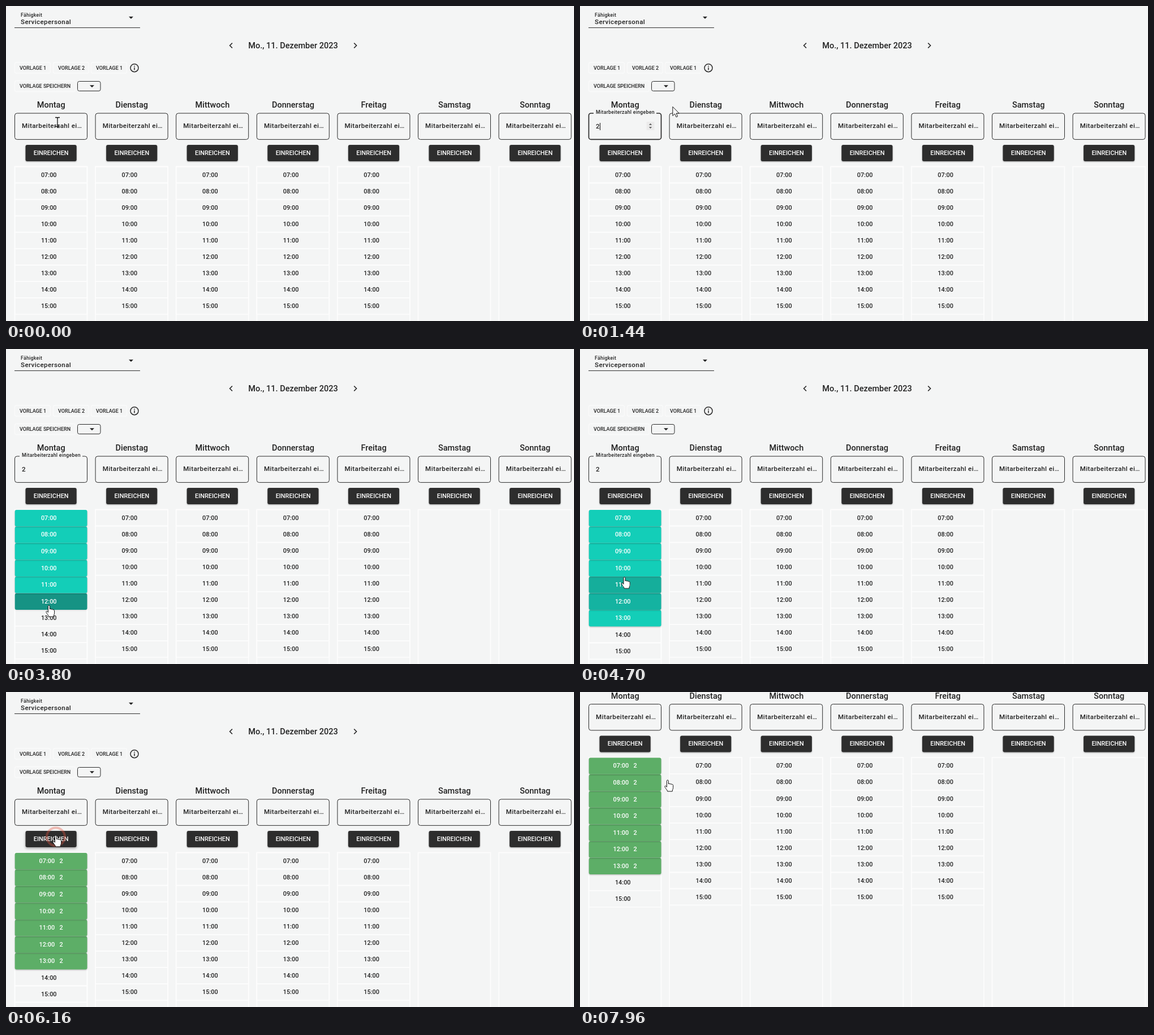
Recreate the animation shown at these times as an HTML page. Size 1004 by 558 pixels, loop 8 s.

```html
<!DOCTYPE html>
<html lang="de">
<head>
<meta charset="utf-8">
<title>Dienstplanung</title>
<style>
  html, body { margin: 0; width: 100%; height: 100%; overflow: hidden; background: #f4f5f5; }
  svg { display: block; width: 1004px; height: 558px; }
  text { font: 500 10.9px Roboto, Arial, sans-serif; fill: #222; white-space: pre; }
  .mid { text-anchor: middle; }
  .head { font-size: 14.5px; }
  .chip { font-size: 9px; }
  .input { font-size: 11.64px; letter-spacing: .031em; }
  .small { font-size: 8.73px; letter-spacing: .031em; }
  .light { fill: #fff; }
  .line { fill: none; stroke: #2b2b2b; }
  .white { fill: none; stroke: #fdfdfd; stroke-width: 1.6; }
  .button { fill: #2d2d2d; filter: drop-shadow(0 1px 1.2px rgba(0,0,0,.35)); }
  .cursor { fill: #fff; stroke: #111; stroke-width: 1; stroke-linejoin: round; }
</style>
</head>
<body>
<script>
const LOOP = 8000, ROWS = 9, TOP = 284.5, ROW = 29.06, PITCH = 142.6;
const DAYS = ['Montag', 'Dienstag', 'Mittwoch', 'Donnerstag', 'Freitag', 'Samstag', 'Sonntag'];
const BG = [244, 245, 245], TEAL = [19, 206, 184], DARK = [22, 147, 132];
const PRESSED = [80, 208, 193], GREEN = [93, 174, 103], INK = [34, 34, 34], WHITE = [255, 255, 255];

// Pointer path: time, x, y
const PATH = [
  [0, 91, 205], [130, 91, 205], [200, 89.5, 208], [1230, 89.5, 208], [1440, 163.5, 178],
  [1580, 214, 240], [1720, 152, 337], [1930, 150, 278], [2060, 112, 270], [2200, 88, 290],
  [2340, 84, 293], [2800, 84, 296], [2880, 80, 314], [2940, 78, 330], [3600, 77, 440],
  [3800, 76, 454], [3900, 76, 468], [4200, 76, 474], [4430, 76, 474], [5260, 84, 260],
  [5330, 88, 254], [6960, 88, 254], [7440, 155, 156]
];
const PICKED = [2880, 3022, 3199, 3376, 3553, 3856, 4100];
const CLICKS = [[400, 89.5, 208], [2340, 84.5, 293], [5500, 88, 256.5]];
const FOCUS = 470, TYPED = 1030, BLUR = 2340, SENT = 5950;

const clamp = v => Math.max(0, Math.min(1, v));
const ramp = (t, start, length) => clamp((t - start) / length);
const smooth = u => u * u * (3 - 2 * u);
const lerp = (a, b, u) => a + (b - a) * u;
const mix = (a, b, u) => a.map((v, i) => lerp(v, b[i], u));
const rgb = c => `rgb(${c.map(Math.round)})`;
const show = (node, on) => node.setAttribute('visibility', on ? 'visible' : 'hidden');

function add(parent, tag, attrs = {}, content) {
  const node = document.createElementNS('http://www.w3.org/2000/svg', tag);
  set(node, attrs);
  if (content) node.textContent = content;
  return parent.appendChild(node);
}
function set(node, attrs) {
  for (const key in attrs) node.setAttribute(key, attrs[key]);
}
const box = (parent, x, y, width, height, rx, cls) =>
  add(parent, 'rect', { x, y, width, height, rx, class: cls });
const label = (parent, x, y, content, cls = '') =>
  add(parent, 'text', { x, y, class: cls }, content);
const path = (parent, d, attrs) => add(parent, 'path', { d, ...attrs });
const arrow = (parent, x, y, w, h) =>
  path(parent, `M${x - w} ${y - h / 2}h${2 * w}l${-w} ${h}z`, { fill: '#222' });

const svg = add(document.body, 'svg', { viewBox: '0 0 1004 558' });
const page = add(svg, 'g');

// Toolbar
label(page, 26, 18.6, 'Fähigkeit', 'small');
label(page, 26, 32.3, 'Servicepersonal', 'input');
path(page, 'M15 38.4H237', { class: 'line' });
arrow(page, 221, 20.7, 4, 4);
label(page, 507.5, 74.7, 'Mo., 11. Dezember 2023', 'mid head');
path(page, 'M400 65.6L395.6 70L400 74.4M615.2 65.6L619.6 70L615.2 74.4', { class: 'line', 'stroke-width': 1.6 });
[[15.5, 63, 'VORLAGE 1'], [83.5, 63, 'VORLAGE 2'], [150.5, 63, 'VORLAGE 1']].forEach(([x, w, name]) => {
  box(page, x, 100, w, 19, 3, 'white').setAttribute('opacity', .6);
  label(page, x + 8.6, 112.7, name, 'chip');
});
box(page, 15.5, 132.5, 107, 19, 3, 'white').setAttribute('opacity', .6);
label(page, 24, 145.2, 'VORLAGE SPEICHERN', 'chip');
add(page, 'circle', { cx: 227, cy: 109.7, r: 7, class: 'line', 'stroke-width': 1.5 });
path(page, 'M227 108.8v4.6M227 105.8v1.6', { class: 'line', 'stroke-width': 1.5 });
box(page, 126.5, 133.5, 40.5, 17, 3, 'line');
arrow(page, 152, 142.2, 4, 4);

// Day columns
const fields = [], buttons = [], rows = [];
DAYS.forEach((day, d) => {
  const x = 15.5 + d * PITCH, mid = x + 64.2;
  label(page, mid, 180, day, 'mid head');
  fields.push({
    frame: box(page, x, 190, 128, 46.4, 4, 'line'),
    gap: box(page, 24, 187, 111, 5, 0, ''),
    text: label(page, x + 12.6, 216.3, 'Mitarbeiterzahl ei…', 'input')
  });
  fields[d].gap.setAttribute('fill', rgb(BG));
  show(fields[d].gap, false);
  buttons.push(box(page, x + 19, 246, 90.2, 29, 3, 'button'));
  label(page, mid, 263.9, 'EINREICHEN', 'mid light');
  box(page, x, TOP, 128, 600, 0, 'white');
  if (d > 4) return;
  for (let i = ROWS - 1; i >= 0; i--) {
    const g = add(page, 'g', { transform: `translate(${x} ${TOP + i * ROW})` });
    const cell = box(g, 0, 0, 128, ROW, 0, 'white');
    const hour = label(g, 46.4, 18.4, String(7 + i).padStart(2, '0') + ':00');
    if (d) continue;
    const fill = box(g, .2, .4, 127.8, 29.3, 3, '');
    g.insertBefore(fill, hour);
    const count = label(g, 79, 18.4, '2', 'light');
    rows[i] = { g, x, cell, fill, hour, count };
  }
});

// Parts of the edited field
const value = label(page, 28, 217, '2', 'input');
const caret = path(page, 'M35.5 207V220', { stroke: '#111' });
const spinner = add(page, 'g');
box(spinner, 117.5, 205, 14, 15, 1, '').setAttribute('fill', '#ebebeb');
path(spinner, 'M121.8 210.8h5.4l-2.7-2.9zM121.8 214.2h5.4l-2.7 2.9z', { fill: '#555' });

const ring = add(svg, 'circle', { fill: 'none', stroke: '#e25440', 'stroke-width': 4 });
const cursors = {
  beam: path(svg, 'M-4-7.5h3l1 1 1-1h3M0-6.5v14M-4 8.5h3l1-1 1 1h3', { fill: 'none', stroke: '#111', 'stroke-width': 1.3 }),
  arrow: path(svg, 'M0 0V16L3.7 12.5L6.2 18.3L8.7 17.2L6.3 11.6H11.3Z', { class: 'cursor' }),
  hand: path(svg, 'M-1.6 1.4C-1.6-.4 1.4-.4 1.4 1.4V7C1.6 5.6 4.2 5.8 4.3 7.4C4.6 6.2 7 6.4 7.1 8.1C7.5 7.2 9.6 7.4 9.6 9.4V13.5C9.6 16 8.2 17 8.2 20H-.4C-.6 17.5-3.4 15.5-4.8 12.5C-6 10.3-3.6 9.6-2.6 11L-1.6 12.4Z', { class: 'cursor' })
};

function pointer(t) {
  const next = PATH.findIndex(p => p[0] > t);
  if (next < 0) return PATH[PATH.length - 1].slice(1);
  if (next === 0) return PATH[0].slice(1);
  const a = PATH[next - 1], b = PATH[next], u = ramp(t, a[0], b[0] - a[0]);
  return [lerp(a[1], b[1], u), lerp(a[2], b[2], u)];
}

// Hover fades over 200 ms: the share of that span spent on each target
function hovers(t) {
  const share = { rows: Array(ROWS).fill(0), button: 0 };
  for (let k = 0; k < 20; k++) {
    const [x, y] = pointer(t - k * 10);
    const i = Math.floor((y - TOP) / 29.55);
    if (x > 15.5 && x < 143.5 && i >= 0 && i < ROWS) share.rows[i] += .05;
    if (x > 34.5 && x < 124.7 && y > 246 && y < 275) share.button += .05;
  }
  return share;
}

function drawRows(t, hover) {
  let y = TOP;
  const sent = ramp(t, SENT, 130);
  rows.forEach((row, i) => {
    const picked = i < PICKED.length ? ramp(t, PICKED[i] - 100, 100) : 0;
    const press = i ? 0 : ramp(t, 2340, 150) * (1 - ramp(t, 2960, 200));
    const h = clamp(hover[i]);
    let color = mix(mix(BG, mix(TEAL, GREEN, sent), picked), DARK, h);
    color = mix(color, PRESSED, press);
    const lit = Math.max(picked, h, press), on = lit > .01;
    const lift = Math.max(picked, press);
    set(row.g, { transform: `translate(${row.x} ${y})` });
    set(row.fill, { fill: rgb(color) });
    row.fill.style.filter = lift > 0
      ? `drop-shadow(0 ${1 + 2 * press}px ${1 + 2 * press}px rgba(0,0,0,${.28 * lift}))` : 'none';
    show(row.fill, on);
    show(row.cell, !on);
    const done = sent > .5 && i < PICKED.length;
    set(row.hour, { x: done ? 43 : 46.4 });
    row.hour.style.fill = rgb(mix(INK, WHITE, lit));
    show(row.count, done);
    y += ROW + (on ? .5 : 0);
  });
}

function drawField(t) {
  const { frame, gap, text } = fields[0];
  const focused = t >= FOCUS && t < BLUR;
  const up = smooth(ramp(t, FOCUS, 150) * (1 - ramp(t, SENT, 120)));
  set(frame, { 'stroke-width': focused ? 1.7 : 1 });
  set(text, { y: lerp(216.3, 190.8, up) });
  text.style.fontSize = lerp(11.64, 8.73, up) + 'px';
  text.textContent = up > .5 ? 'Mitarbeiterzahl eingeben' : 'Mitarbeiterzahl ei…';
  show(gap, up > .5);
  show(value, t >= TYPED && t < SENT);
  show(spinner, focused);
  show(caret, focused && (t < TYPED || (t - TYPED) % 1000 < 500));
  set(caret, { transform: `translate(${t < TYPED ? -7 : 0} 0)` });
}

function draw(t) {
  const hover = hovers(t), [x, y] = pointer(t);
  drawRows(t, hover.rows);
  drawField(t);

  const dark = clamp(hover.button) * (1 - ramp(t, 5750, 200));
  buttons[0].style.fill = rgb(mix([45, 45, 45], [28, 28, 28], dark));
  const lift = clamp(hover.button);
  buttons[0].style.filter = `drop-shadow(0 ${1 + lift}px ${1.2 + lift}px rgba(0,0,0,.35))`;

  const click = CLICKS.find(c => t >= c[0] && t < c[0] + 900);
  show(ring, click);
  if (click) {
    const u = (t - click[0]) / 900;
    set(ring, { cx: click[1], cy: click[2], r: 2 + 19 * u, opacity: .6 * (1 - u ** 3) });
  }

  const kind = t < 1370 ? 'beam' : t < 2030 ? 'arrow' : 'hand';
  for (const name in cursors) show(cursors[name], name === kind);
  set(cursors[kind], { transform: `translate(${x} ${y})` });
  set(page, { transform: `translate(0 ${-168.5 * smooth(ramp(t, 7640, 310))})` });
}

const begin = performance.now();
function tick() {
  draw((performance.now() - begin) % LOOP);
  requestAnimationFrame(tick);
}
tick();
</script>
</body>
</html>
```
